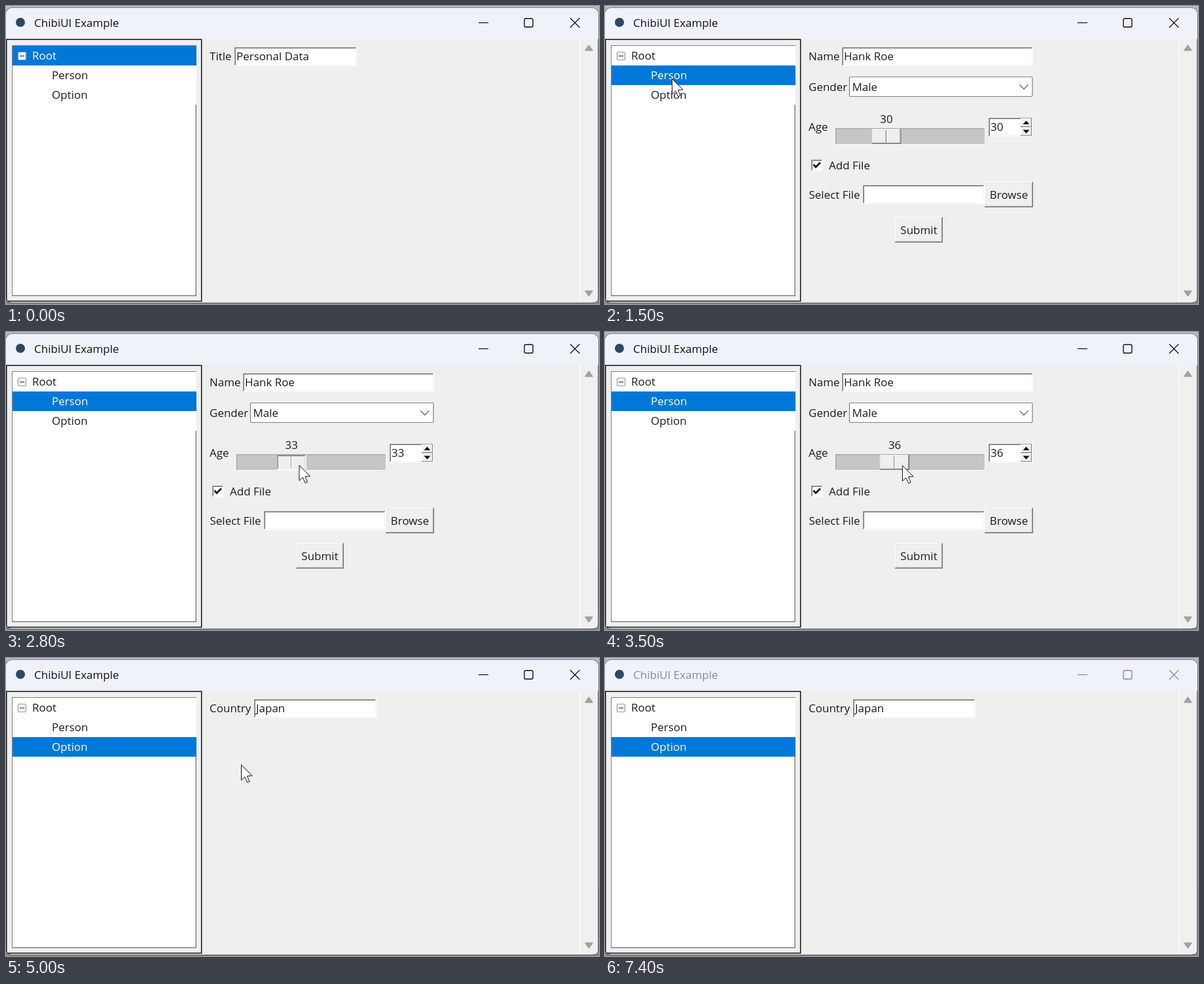
Animation, 906 px wide and 456 px high, one loop 7500 ms. Source, as an HTML page with a canvas:

```html
<!DOCTYPE html>
<html lang="en">
<head>
<meta charset="utf-8">
<title>ChibiUI Example</title>
<style>
html, body { margin: 0; width: 100%; height: 100%; overflow: hidden; background: #b9b8c4; }
canvas { display: block; }
</style>
</head>
<body>
<canvas id="stage" width="906" height="456"></canvas>
<script>
const ctx = document.getElementById('stage').getContext('2d');
const LOOP = 7500, STEP = 100;
const FACE = '#efefef', INK = '#1c1c1c', BLUE = '#0078d7';

// Moments of the two tree clicks, the slider drag and the loss of focus.
const CLICK_PERSON = 1100, CLICK_OPTION = 4700, BLUR = 7300;
const DRAG_FROM = 2300, DRAG_TO = 3300, RELEASE = 3500;

// Cursor keys: time, x, y; it is hidden outside these times.
const PATH = [
  [300, 880, 440], [1000, 102, 111], [1700, 102, 111], [2200, 441, 203],
  [DRAG_FROM, 441, 203], [DRAG_TO, 454, 204], [3700, 454, 204], [4100, 224, 180],
  [4500, 100, 135], [CLICK_OPTION, 100, 135], [5000, 359, 163], [5200, 453, 180],
  [5600, 390, 187]
];

function rect(x, y, w, h, color) {
  ctx.fillStyle = color;
  ctx.fillRect(x, y, w, h);
}

function line(points, color, width = 1) {
  ctx.beginPath();
  points.forEach(([x, y]) => ctx.lineTo(x, y));
  ctx.strokeStyle = color;
  ctx.lineWidth = width;
  ctx.stroke();
}

function poly(points, color) {
  ctx.beginPath();
  points.forEach(([x, y]) => ctx.lineTo(x, y));
  ctx.closePath();
  ctx.fillStyle = color;
  ctx.fill();
}

function round(x, y, w, h, r, fill, stroke, width = 1) {
  ctx.beginPath();
  ctx.roundRect(x, y, w, h, r);
  if (fill) { ctx.fillStyle = fill; ctx.fill(); }
  if (stroke) { ctx.strokeStyle = stroke; ctx.lineWidth = width; ctx.stroke(); }
}

function text(str, x, y, color = INK, align = 'left') {
  ctx.font = '17px "Open Sans", "Noto Sans", sans-serif';
  ctx.textAlign = align;
  ctx.fillStyle = color;
  ctx.fillText(str, x, y);
}

function bevel(x, y, w, h, fill, light, dark, size) {
  rect(x, y, w, h, dark);
  rect(x, y, w - size, h - size, light);
  rect(x + size, y + size, w - 2 * size, h - 2 * size, fill);
}

function raised(x, y, w, h) {
  bevel(x, y, w, h, FACE, '#fff', '#696969', 1.2);
  bevel(x + 1.2, y + 1.2, w - 2.4, h - 2.4, FACE, '#f4f4f4', '#a0a0a0', 1.2);
}

function sunken(x, y, w, h, fill) {
  bevel(x, y, w, h, fill, '#a0a0a0', '#fff', 1);
  bevel(x + 1, y + 1, w - 2, h - 2, fill, '#777', '#f2f2f2', 1);
}

function entry(x, y, w, value = '') {
  sunken(x, y, w, 29, '#fff');
  text(value, x + 3, y + 20);
}

function button(x, y, w, h, label) {
  raised(x, y, w, h);
  text(label, x + w / 2, y + 26, INK, 'center');
}

function titleBar(active) {
  const color = active ? '#111' : '#8b8b8e';
  rect(0, 3, 905, 47.5, '#f0f2fa');
  ctx.beginPath();
  ctx.arc(22, 25, 7, 0, Math.PI * 2);
  ctx.fillStyle = '#30485f';
  ctx.fill();
  text('ChibiUI Example', 43, 32, color);
  rect(722, 25, 15, 1.2, color);
  round(792, 19.2, 13, 13, 2, null, color, 1.4);
  line([[862, 18.5], [876.5, 33]], color, 1.3);
  line([[876.5, 18.5], [862, 33]], color, 1.3);
}

function tree(selected) {
  ctx.strokeStyle = '#111';
  ctx.lineWidth = 1.5;
  ctx.strokeRect(0.7, 51.2, 298, 400.4);
  rect(9, 60, 282, 384, '#808080');
  rect(10, 61, 279.5, 381.5, '#fff');
  rect(289, 61, 2, 90, '#fff');
  rect(10, 61 + selected * 30, 281, 30, BLUE);
  ['Root', 'Person', 'Option'].forEach((name, i) =>
    text(name, i ? 70 : 40, 82 + i * 30, i === selected ? '#fff' : INK));
  round(18.5, 70.5, 12, 12, 1.5, '#f7f8fa', '#929ba3', 1.2);
  line([[21, 76.5], [28, 76.5]], '#3c5c96', 1.6);
}

function scrollBar() {
  rect(876, 51, 2, 402, '#fbfbfb');
  rect(878, 51, 26, 402, '#f0f0f0');
  ctx.lineJoin = 'round';
  for (const [y, d] of [[64, 1], [440, -1]]) {
    const tri = [[890.5, y - 4 * d], [896, y + 4 * d], [885, y + 4 * d], [890.5, y - 4 * d]];
    poly(tri, '#a2a2a2');
    line(tri, '#a2a2a2', 1.5);
  }
  ctx.lineJoin = 'miter';
}

function slider(age, pressed) {
  const x = 407.5 + (age - 30) * 2.1;
  bevel(352, 187, 229, 25, '#c6c6c6', '#a0a0a0', '#f8f8f8', 1.2);
  if (pressed) sunken(x, 188, 45, 23, FACE);
  else raised(x, 188, 45, 23);
  rect(x + 21.3, 190, 1.2, 19, pressed ? '#999' : '#777');
  rect(x + 22.5, 190, 1, 19, '#fff');
  text(age, x + 22.5, 179, INK, 'center');
}

function spinBox(age) {
  entry(586, 171, 67, String(age));
  for (const [y, d] of [[172, 1], [185.5, -1]]) {
    bevel(635, y, 17, 13, FACE, '#fff', '#777', 1.2);
    const c = y + 6.5;
    poly([[643.5, c - 3 * d], [648.5, c + 2.5 * d], [638.5, c + 2.5 * d]], '#111');
  }
}

function personForm(age, pressed) {
  text('Name', 311, 83);
  entry(362, 63, 292, 'Hank Roe');
  text('Gender', 311, 130);
  round(373.5, 108.5, 279.5, 30, 1.5, '#fff', '#7f7f7f', 1.2);
  text('Male', 377.5, 130);
  line([[633.5, 120.5], [640, 127], [646.5, 120.5]], '#666', 1.3);
  text('Age', 311, 191);
  slider(age, pressed);
  spinBox(age);
  sunken(315, 235, 18, 18, '#fff');
  line([[318.5, 242.5], [322, 246.5], [329, 239.5]], '#111', 2.8);
  text('Add File', 342, 250);
  text('Select File', 311.5, 295);
  entry(394, 274, 186);
  button(580, 269, 74, 39, 'Browse');
  button(443, 323, 73, 39, 'Submit');
}

function cursor(t) {
  const i = PATH.findIndex(k => k[0] >= t);
  if (i < 0 || t < PATH[0][0]) return;
  const b = PATH[i], a = PATH[Math.max(0, i - 1)];
  const p = b === a ? 1 : (t - a[0]) / (b[0] - a[0]);
  ctx.save();
  ctx.translate(a[1] + (b[1] - a[1]) * p + 0.5, a[2] + (b[2] - a[2]) * p + 0.5);
  const arrow = [[0, 0], [0, 23.5], [5.3, 18.5], [9.2, 27], [12.6, 25.5], [9, 17.2], [16.6, 16.6], [0, 0]];
  poly(arrow, '#fff');
  line(arrow, '#111', 1);
  ctx.restore();
}

function draw(t) {
  rect(0, 0, 906, 456, '#b9b8c4');
  rect(0, 353, 906, 103, '#8d8087');
  ctx.save();
  round(0, 3, 905, 451.5, 9, FACE, '#6e6e73', 1.6);
  ctx.clip();
  titleBar(t < BLUR);
  const page = t < CLICK_PERSON ? 0 : t < CLICK_OPTION ? 1 : 2;
  tree(page);
  scrollBar();
  if (page === 0) {
    text('Title', 311, 83);
    entry(349, 63, 187, 'Personal Data');
  } else if (page === 1) {
    const drag = Math.min(1, Math.max(0, (t - DRAG_FROM) / (DRAG_TO - DRAG_FROM)));
    personForm(Math.round(30 + 6 * drag), t >= DRAG_FROM && t < RELEASE);
  } else {
    text('Country', 311, 83);
    entry(379, 63, 187, 'Japan');
  }
  ctx.restore();
  cursor(t);
}

const start = performance.now();
function tick() {
  const t = (performance.now() - start) % LOOP;
  draw(Math.floor(t / STEP) * STEP);
  requestAnimationFrame(tick);
}
tick();
</script>
</body>
</html>
```
